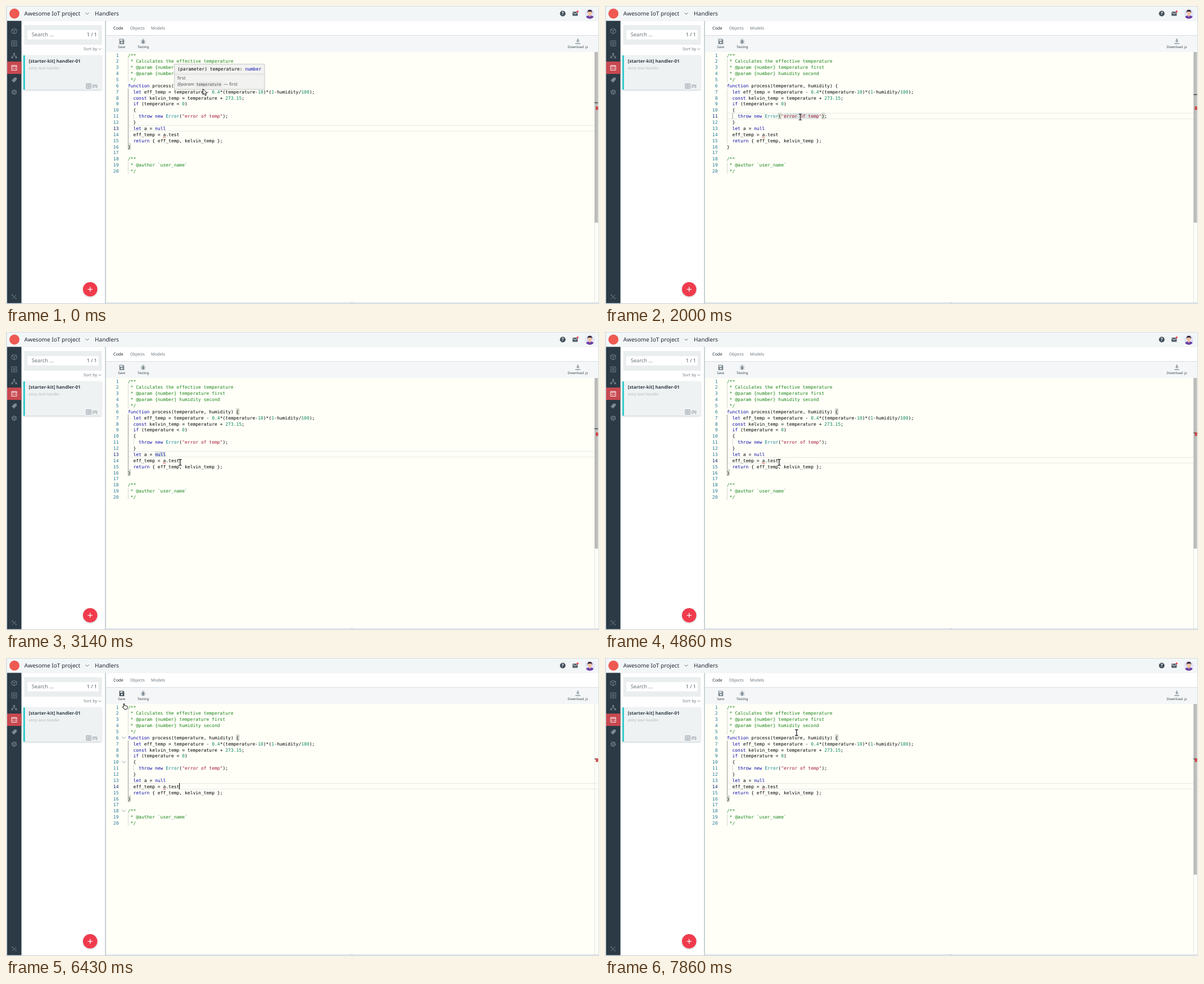
Animation of 1055x531 px, one loop 8000 ms. Source, as an HTML page:

```html
<!DOCTYPE html>
<html lang="en">
<head>
<meta charset="utf-8">
<title>Handler editor</title>
<style>
  html, body { margin: 0; width: 100%; height: 100%; overflow: hidden; background: #fff; }
  svg { display: block; width: 1055px; height: 531px; }
  text { font-family: "Noto Sans", "Open Sans", sans-serif; white-space: pre; text-rendering: geometricPrecision; fill: #36424b; }
  .mono { font-family: "DejaVu Sans Mono", monospace; font-size: 8.01px; fill: #000; }
  .title { font-size: 10.1px; font-weight: 500; fill: #1f2a32; }
  .tab { font-size: 7.33px; fill: #6d777e; }
  .tool { font-size: 6px; font-weight: 500; text-anchor: middle; fill: #36424b; }
  .num { text-anchor: end; fill: #237893; }
  .num.on { fill: #0b216f; }
  .kw { fill: #0808a8; } .str { fill: #a31530; } .lit { fill: #098658; }
  .com { fill: #168316; } .type { fill: #0a8585; }
  .line { fill: none; stroke: #7b8993; stroke-width: .9; }
  .guide { stroke: #d5d6d0; stroke-width: 1; }
  .guide.on { stroke: #979892; }
  .pair { fill: #e2ebda; stroke: #b5b8b0; stroke-width: .8; }
  .mark { fill: #dde5e3; }
</style>
</head>
<body>
<svg viewBox="0 0 1055 531">
  <defs>
    <filter id="soft" x="-20%" y="-20%" width="140%" height="150%">
      <feDropShadow dx="0" dy="1" stdDeviation="1.5" flood-color="#324650" flood-opacity=".3"/>
    </filter>
  </defs>

  <!-- page frame -->
  <rect width="1055" height="531" fill="#d5dce1"/>
  <rect x="1.5" y="1" width="1052.5" height="25.5" fill="#f3f6f7"/>
  <rect x="27" y="26.5" width="149" height="503" fill="#fff"/>
  <rect x="178" y="26.5" width="876" height="26" fill="#fff"/>
  <rect x="178" y="52.5" width="876" height="29.5" fill="#f4f6f7"/>
  <path d="M178 52.5H1054" stroke="#d9dee1"/>
  <rect x="178" y="82" width="876" height="446" fill="#fffff8"/>
  <rect x="178" y="528" width="876" height="2" fill="#dfe4e6"/>
  <path d="M613 528.5h4" stroke="#bcc3c7"/>
  <path d="M177 26.5V530" stroke="#c9d1d5" stroke-width="2"/>

  <!-- header -->
  <circle cx="15" cy="13.5" r="9" fill="#ee5a52"/>
  <text class="title" x="32.5" y="17.3">Awesome IoT project</text>
  <path class="line" style="stroke:#4a565f" d="M141.5 12l3 3 3-3"/>
  <text class="title" x="158" y="17.3">Handlers</text>
  <circle cx="990.5" cy="13.5" r="5" fill="#42505b"/>
  <text x="990.5" y="16.4" style="font-size:8px;font-weight:700;text-anchor:middle;fill:#fff">?</text>
  <rect x="1007.8" y="10" width="9.4" height="7.4" rx="1" fill="#53616b"/>
  <path d="M1008.5 11.3l4 2.8 4-2.8" fill="none" stroke="#f3f6f7"/>
  <circle cx="1017" cy="9.8" r="1.7" fill="#ef3d4c"/>
  <circle cx="1038.7" cy="14" r="8.7" fill="#e4e6f7"/>
  <path d="M1032 19.5q1.5-2.7 6.7-2.7t6.7 2.7a8.7 8.7 0 0 1-13.4 0" fill="#6b3fa8"/>
  <path d="M1037 14h3.4v4l-1.7 1.3-1.7-1.3z" fill="#eeb491"/>
  <circle cx="1038.7" cy="12.3" r="3.7" fill="#f4c3a0"/>
  <path d="M1034.6 12.4q-.8-5.6 4.1-5.6t4.1 5.6l-1.2-2.3h-5.8z" fill="#33273d"/>

  <!-- navigation -->
  <rect x="2" y="26.5" width="25.5" height="503" fill="#2b3a45"/>
  <rect x="2" y="99" width="25.5" height="22" fill="#c84950"/>
  <g class="line">
    <path d="M14.5 40l4.5 2v5.2l-4.5 2.3-4.5-2.3v-5.2zM10 42l4.5 2.2L19 42M14.5 44.2v5.3"/>
    <path d="M10 62.2h9v9h-9zM12.8 65h3.4v3.4h-3.4z"/>
    <path d="M14.5 86v3M11 91v-2h7v2"/>
    <path d="M10 106h9v8.5h-9zM10 107.3h9M13.3 109.3l-1.6 1.7 1.6 1.7M15.7 109.3l1.6 1.7-1.6 1.7" stroke="#fff"/>
    <circle cx="14.5" cy="153.5" r="3.6" stroke-width="2" stroke-dasharray="2.6 1.1"/>
    <circle cx="14.5" cy="153.5" r="1.2"/>
    <path d="M10.8 514.5l7.5 7.5M18.3 514.5l-7.5 7.5M10 516l2.2-2.2M17 522.8l2-2"/>
  </g>
  <path d="M13 84h3v2.6h-3zM9.6 90.4h2.8V93H9.6zM16.6 90.4h2.8V93h-2.8zM10 132.6l5-5h4v4l-5 5z" fill="#7b8993"/>

  <!-- handler list -->
  <rect x="32.5" y="34" width="138" height="35" fill="#eaeeef"/>
  <rect x="38" y="43" width="126.5" height="16.5" fill="#fff"/>
  <text x="45.8" y="54.4" style="font-size:9.2px;fill:#69737a">Search ...</text>
  <text x="143.7" y="54.4" style="font-size:9px;fill:#4d5960">1 / 1</text>
  <text x="138" y="79.4" style="font-size:7.4px;fill:#737e85">Sort by</text>
  <path class="line" d="M164.5 75.6l2.4 2.4 2.4-2.4"/>
  <g filter="url(#soft)">
    <rect x="32" y="88" width="137.5" height="61" fill="#eff2f3"/>
    <rect x="31" y="88" width="2.7" height="61" fill="#25c8c9"/>
  </g>
  <text x="40.6" y="101.4" style="font-size:8.05px;font-weight:600;fill:#333f48">[starter-kit] handler-01</text>
  <text x="40.8" y="113.3" style="font-size:6.67px;font-style:italic;fill:#b3babe">entry level handler</text>
  <path class="line" d="M143 138.7h8.2v7.8H143zM145.5 141h3.2v3.2h-3.2z"/>
  <text x="154.2" y="145.2" style="font-size:7px;font-weight:500">(1)</text>
  <circle cx="149.7" cy="504.8" r="12.8" fill="#f03b4e" filter="url(#soft)"/>
  <path d="M145.5 504.8h8.4M149.7 500.6v8.4" stroke="#fff" stroke-width="1.2"/>

  <!-- tabs and tools -->
  <text class="tab" x="191" y="41.7" style="fill:#1f2a32;font-weight:500">Code</text>
  <text class="tab" x="220.8" y="41.7">Objects</text>
  <text class="tab" x="258" y="41.7">Models</text>
  <g id="save">
    <path d="M201.6 58.4h6.8l1.9 1.9v7.6h-8.7z"/>
    <path d="M203 59.6h4.5v2.3H203z" fill="#f4f6f7"/>
    <circle cx="206" cy="65" r="1.5" fill="#f4f6f7"/>
  </g>
  <text class="tool" x="205.7" y="74.7">Save</text>
  <g fill="#87929a">
    <ellipse cx="244" cy="63.8" rx="2.2" ry="3.6"/>
    <path d="M240 60.5l8 6.5M248 60.5l-8 6.5M239.5 63.8h9M242.3 58.3l3 2.5M245.7 58.3l-3 2.5" stroke="#87929a" stroke-width=".7"/>
  </g>
  <text class="tool" x="244.2" y="74.7">Testing</text>
  <path d="M1016.2 58.3h2.4v3.4h2.2l-3.4 3.4-3.4-3.4h2.2zM1013 66h8.8v1.7h-8.8z" fill="#98a3aa"/>
  <text class="tool" x="1017.4" y="74.7">Download .js</text>

  <!-- editor -->
  <path d="M1047.5 82V528" stroke="#e3e5df"/>
  <g id="focus"></g>
  <g id="code"></g>
  <rect id="caret" x="308" y="223" width="1.1" height="11" fill="#000"/>
  <g id="folds" class="line"></g>
  <rect id="bar" x="1047" y="82" width="6.3" height="304" fill="#bcbcb9"/>
  <rect id="tick" x="1047" width="6.3" height="1.6" fill="#4c4c4c"/>
  <rect x="1049.5" y="179" width="3.8" height="6.2" fill="#cf3d40"/>

  <g id="tip">
    <rect x="299.5" y="103.5" width="160.5" height="45" fill="#f2f2f1" stroke="#c5c6c4"/>
    <path d="M300 121.5h160" stroke="#d4d5d3"/>
    <text class="mono" x="305" y="115">(parameter) temperature: <tspan class="kw">number</tspan></text>
    <text x="304.8" y="131.4" style="font-size:8px;fill:#55595c">first</text>
    <text x="304.8" y="142.4" style="font-size:7.9px;font-style:italic;fill:#55595c">@param</text>
    <rect x="337" y="135.3" width="47.5" height="9.5" rx="1.5" fill="#e5e5e4"/>
    <text class="mono" x="338.6" y="142.4" style="font-size:6.67px;fill:#44484a">temperature</text>
    <text x="387" y="142.4" style="font-size:8px;fill:#55595c">— first</text>
  </g>

  <g id="mouse">
    <path id="arrow" d="M.3.5v10.3l2.5-2.2 1.6 3.8 1.9-.8-1.6-3.7 3.2-.2z" fill="#fff" stroke="#111" stroke-width="1"/>
    <g id="beam" fill="none">
      <path d="M-2.8-5.2H-1Q0-5.2 0-4.4V4.4Q0 5.2-1 5.2H-2.8M2.8-5.2H1Q0-5.2 0-4.4M0 4.4Q0 5.2 1 5.2H2.8" stroke="#fff" stroke-width="2.4"/>
      <path d="M-2.8-5.2H-1Q0-5.2 0-4.4V4.4Q0 5.2-1 5.2H-2.8M2.8-5.2H1Q0-5.2 0-4.4M0 4.4Q0 5.2 1 5.2H2.8" stroke="#111" stroke-width="1.2"/>
    </g>
    <path id="hand" d="M-.9.8Q0-.3.9.8V4Q2 3.3 2.8 4.2 3.8 3.6 4.4 4.5 6 4.2 6 5.8V8L4.8 10.4H.4L-2.6 6.6Q-2.6 5.3-.9 6.2z" fill="#fff" stroke="#111" stroke-width="1"/>
  </g>
</svg>
<script>
const LOOP = 8000, LEFT = 216.8, TOP = 82, CELL = 4.822, ROW = 10.86;
const $ = id => document.getElementById(id);
const col = c => LEFT + c * CELL;
const row = n => TOP + (n - 1) * ROW;

function add(parent, tag, attrs, text) {
  const el = document.createElementNS("http://www.w3.org/2000/svg", tag);
  for (const key in attrs) el.setAttribute(key, attrs[key]);
  if (text) el.textContent = text;
  parent.append(el);
  return el;
}

const source = `/**
 * Calculates the effective temperature
 * @param {number} temperature first
 * @param {number} humidity second
 */
function process(temperature, humidity) {
  let eff_temp = temperature - 0.4*(temperature-10)*(1-humidity/100);
  const kelvin_temp = temperature + 273.15;
  if (temperature < 0)
  {
    throw new Error("error of temp");
  }
  let a = null
  eff_temp = a.test
  return { eff_temp, kelvin_temp };
}

/**
 * @author \`user_name\`
 */`.split("\n");

const rules = [
  ["com", /^\s?[/*].*/], ["str", /^"[^"]*"/], ["lit", /^\d+(\.\d+)?/], ["type", /^Error\b/],
  ["kw", /^(function|let|const|if|throw|new|return|null)\b/], ["", /^(\w+|\s+|.)/]
];

function paint(el, line) {
  let rest = line;
  while (rest) {
    // Comments only begin at the start of a line
    const usable = rest === line ? rules : rules.slice(1);
    const [name, rule] = usable.find(([, r]) => r.test(rest));
    const token = rest.match(rule)[0];
    add(el, "tspan", { class: name }, token);
    rest = rest.slice(token.length);
  }
}

const guide = (c, from, to) => add($("code"), "path",
  { class: "guide", d: `M${col(c) + .6} ${row(from)}V${row(to + 1)}` });
guide(0, 2, 5);
guide(0, 19, 20);
const outer = guide(0, 7, 15), inner = guide(2, 11, 11);

const numbers = source.map((line, i) => {
  const y = row(i + 1) + 8.6;
  paint(add($("code"), "text", { class: "mono", x: LEFT, y }), line);
  return add($("code"), "text", { class: "mono num", x: 200.5, y }, String(i + 1));
});
add($("code"), "path", { d: "M279.5 234q.6-1.4 1.2 0t1.2 0 1.2 0 1.2 0", fill: "none", stroke: "#e0281c", "stroke-width": .9 });
for (const n of [1, 6, 10, 18]) add($("folds"), "path", { d: `M206.3 ${row(n) + 4}l3.2 3.2 3.2-3.2` });

// Editor focus: time, line, bracket pair as [line, column], marked word as [column, length]
const body = [[6, 40], [16, 0]], call = [[11, 19], [11, 35]];
const focus = [
  [0, 13, body], [1430, 11, call], [2000, 11, call, [21, 13]],
  [2710, 15, [[15, 9], [15, 33]]],
  [3000, 13, body], [3140, 13, body, [10, 4]], [3290, 14, body]
];

// Pointer: time, shape, x, y
const pointer = [
  [0, "arrow", 350, 147.3], [140, "beam", 348.5, 159], [430, "beam", 345, 167], [570, "beam", 340, 177],
  [860, "beam", 337.6, 182.8], [1000, "beam", 343, 191], [1140, "beam", 347.4, 197.8],
  [2140, "beam", 347, 209], [2430, "beam", 332, 222], [2570, "beam", 318, 234], [2710, "beam", 310, 238.5],
  [3000, "beam", 309.8, 232.3], [5710, "beam", 276, 178], [5860, "beam", 228, 112], [6000, "hand", 210, 81],
  [7290, "beam", 230, 93], [7430, "beam", 250, 107], [7570, "beam", 274.5, 122], [7860, "beam", 340.8, 133]
];

const blinks = [3290, 3860, 4430, 4860, 5430, 5860, 6430, 6860];

const latest = (list, t) => list.filter(item => item[0] <= t).pop();
const within = (t, from, to) => t >= from && t < to;
const show = (id, on) => $(id).setAttribute("visibility", on ? "visible" : "hidden");
const ramp = (t, from, to) => Math.min(1, Math.max(0, (t - from) / (to - from)));

let shown;
function setFocus(state) {
  if (state === shown) return;
  shown = state;
  const [, line, pair, word] = state, group = $("focus"), y = row(line);
  group.replaceChildren();
  add(group, "path", { d: `M${LEFT} ${y + .4}H1053M${LEFT} ${y + ROW - .4}H1053`, stroke: "#e6e7e1" });
  if (word) add(group, "rect", { class: "mark", x: col(word[0]), y: y + .3, width: word[1] * CELL, height: ROW - .6 });
  for (const [n, c] of pair)
    add(group, "rect", { class: "pair", x: col(c) + .2, y: row(n) + .5, width: CELL - .2, height: ROW - 1 });
  numbers.forEach((el, i) => el.classList.toggle("on", i + 1 === line));
  outer.classList.toggle("on", line !== 11);
  inner.classList.toggle("on", line === 11);
  $("tick").setAttribute("y", 157 + (line - 11) * 7.3);
}

function draw(t) {
  setFocus(latest(focus, t));
  const [, shape, x, y] = latest(pointer, t);
  $("mouse").setAttribute("transform", `translate(${x} ${y})`);
  for (const id of ["arrow", "beam", "hand"]) show(id, id === shape);
  show("tip", t < 140);
  show("caret", blinks.filter(b => b <= t).length % 2);
  show("folds", within(t, 5860, 7430));
  $("save").setAttribute("fill", shape === "hand" ? "#46535c" : "#7f8b93");
  $("bar").setAttribute("opacity", 1 - ramp(t, 5710, 6400) + ramp(t, 7290, 7430));
}

const start = performance.now();
function tick() {
  draw((performance.now() - start) % LOOP);
  requestAnimationFrame(tick);
}
tick();
</script>
</body>
</html>
```
